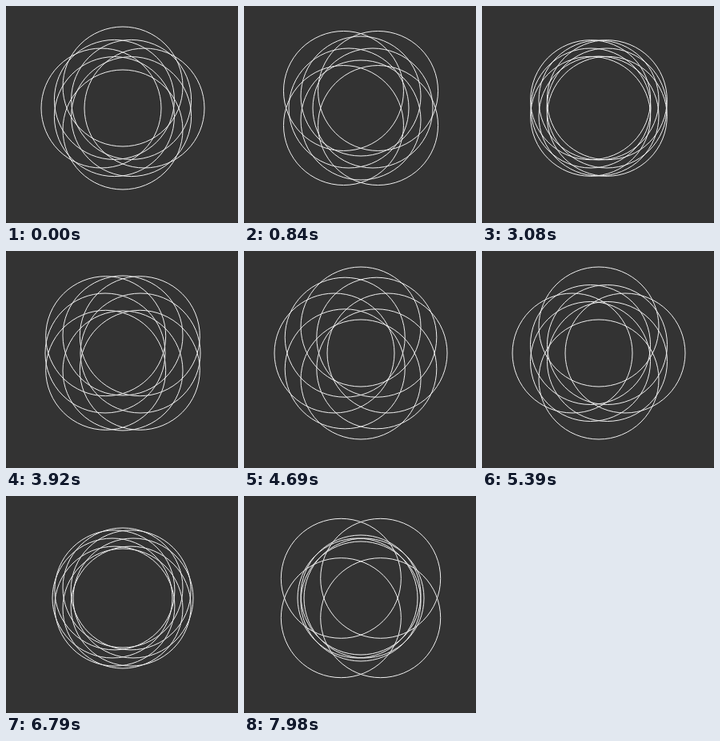
Recreate the animation shown at these times as an HTML page with a canvas. Size 290 px wide and 272 px high, loop 8000 ms.

```html
<!DOCTYPE html>
<html lang="en">
<head>
<meta charset="utf-8">
<title>Eight circles</title>
<style>
  html, body { margin: 0; width: 100%; height: 100%; overflow: hidden; background: #222; }
  canvas { display: block; border-radius: 3px; }
</style>
</head>
<body>
<canvas id="stage" width="290" height="272"></canvas>
<script>
  const ctx = document.getElementById('stage').getContext('2d');
  const LOOP = 8000, STEP = 70;
  const CX = 146, CY = 128, RADIUS = 75;
  const RESTART = 33;             // step at which all circles meet again
  const AXIS_MAX = 38, DIAG_MAX = 26.6;

  // Bounces between -max and max at one unit per step, starting at 0.
  function bounce(n, max) {
    const p = (n + max) % (4 * max);
    return p < 2 * max ? p - max : 3 * max - p;
  }

  // The diagonal circles slow down a little on their way out.
  function diagonal(n) {
    return 34 * Math.sin(bounce(n, DIAG_MAX) / 32.5);
  }

  function offsets(step) {
    if (step < RESTART) return [27 - step, diagonal(step + 10.3)];
    const n = Math.max(0, step - RESTART - 1);
    return [bounce(n, AXIS_MAX), diagonal(n)];
  }

  function circle(dx, dy) {
    ctx.beginPath();
    ctx.arc(CX + dx, CY + dy, RADIUS, 0, Math.PI * 2);
    ctx.stroke();
  }

  function draw(time) {
    const [axis, diag] = offsets(Math.floor((time % LOOP) / STEP));
    ctx.fillStyle = '#333';
    ctx.fillRect(0, 0, 290, 272);
    ctx.strokeStyle = '#f0f0f0';
    ctx.lineWidth = 1;
    for (const s of [-1, 1]) {
      circle(s * axis, 0);
      circle(0, s * axis);
      circle(s * diag, diag);
      circle(s * diag, -diag);
    }
  }

  const start = performance.now();
  function tick() {
    draw(performance.now() - start);
    requestAnimationFrame(tick);
  }
  tick();
</script>
</body>
</html>
```
